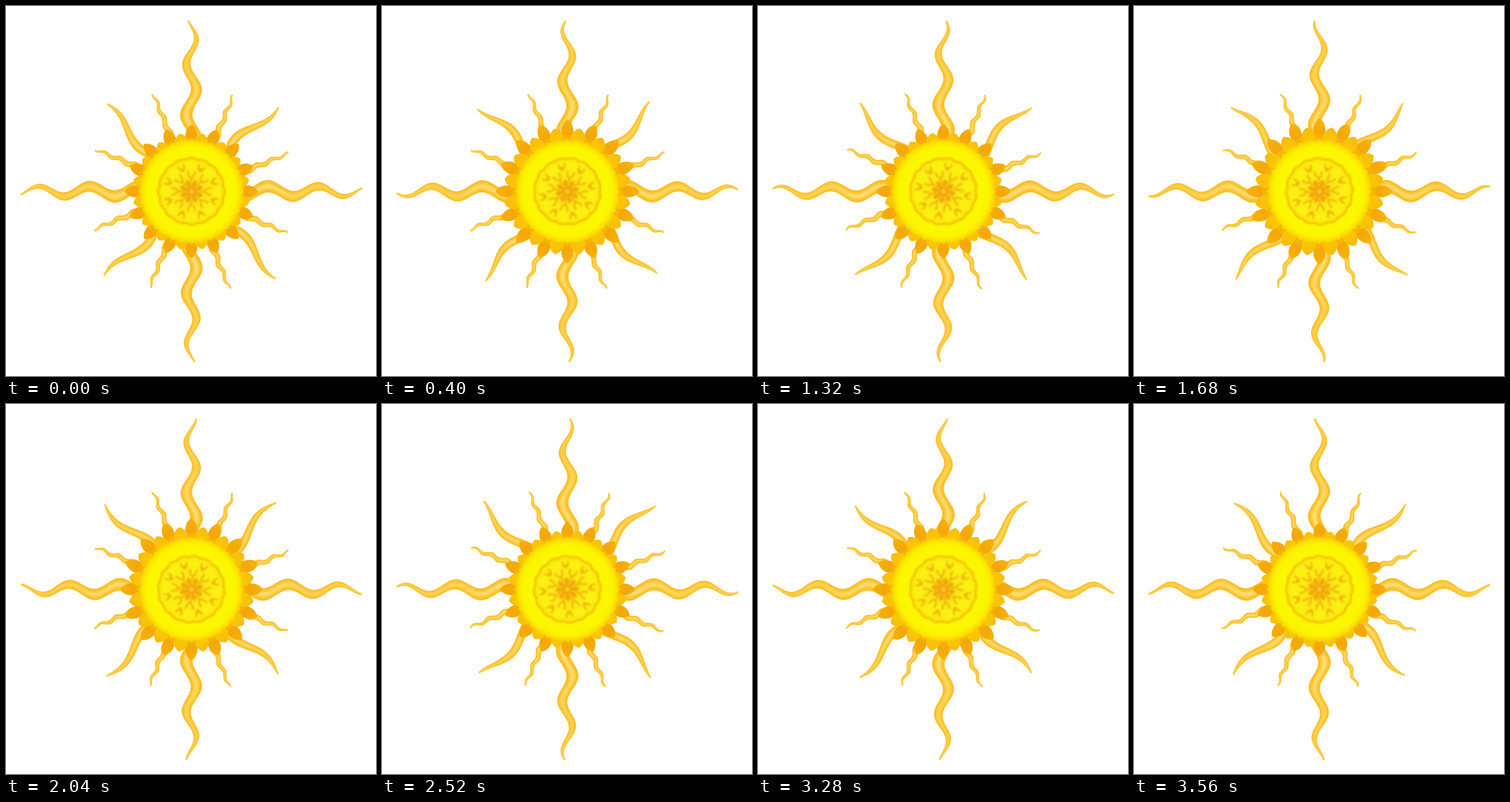
An HTML page with a canvas for the animation above (3.6 s loop, 512 by 512 pixels).

```html
<!DOCTYPE html>
<html lang="en">
<head>
<meta charset="utf-8">
<title>Sun</title>
<style>
  html, body { margin: 0; width: 100%; height: 100%; overflow: hidden; background: #fff; }
  canvas { display: block; width: 512px; height: 512px; }
</style>
</head>
<body>
<canvas id="stage" width="512" height="512"></canvas>
<script>
const TAU = Math.PI * 2;
const MID = 256.5;
const LOOP = 3600;
const STEP = 40;
const ctx = document.getElementById('stage').getContext('2d');

// Waves run outward along each ray; crest is the radius of a peak at time 0.
const LONG = { count: 4, turn: 0, from: 72, to: 236, wave: 70, crest: 141, period: 600,
               amp: [7, 7], shift: 0, width: [18, 2.5] };
const MEDIUM = { count: 4, turn: TAU / 8, from: 72, to: 168, wave: 110, crest: 153, period: 600,
                 amp: [8, 6.5], shift: -1.2, width: [13, 2] };
const SMALL = { count: 8, turn: TAU / 16, from: 72, to: 145, wave: 23, crest: 131.5, period: 400,
                amp: [1.6, 1.8], shift: 2.8, width: [8.5, 2.2] };

const mix = (a, b, k) => a + (b - a) * k;

function fan(c, count, turn, draw) {
  for (let i = 0; i < count; i++) {
    c.save();
    c.rotate(turn + i * TAU / count);
    draw(c);
    c.restore();
  }
}

function radial(c, r0, r1, stops) {
  const g = c.createRadialGradient(0, 0, r0, 0, 0, r1);
  stops.forEach(([at, color]) => g.addColorStop(at, color));
  return g;
}

function disc(c, x, y, r, fill) {
  c.fillStyle = fill;
  c.beginPath();
  c.arc(x, y, r, 0, TAU);
  c.fill();
}

function rayPath(ray, t, fat) {
  const left = [], right = [];
  for (let r = ray.from; r <= ray.to; r++) {
    const k = (r - ray.from) / (ray.to - ray.from);
    const x = ray.shift + mix(...ray.amp, k) *
      Math.cos(TAU * ((r - ray.crest) / ray.wave - t / ray.period));
    const half = fat * mix(...ray.width, k * k) / 2;
    left.push([x - half, -r]);
    right.unshift([x + half, -r]);
  }
  const path = new Path2D();
  left.concat(right).forEach(p => path.lineTo(...p));
  path.closePath();
  return path;
}

function drawRays(ray, t) {
  const edge = rayPath(ray, t, 1);
  const soft = rayPath(ray, t, 0.65);
  const core = rayPath(ray, t, 0.32);
  fan(ctx, ray.count, ray.turn, c => {
    c.fillStyle = '#fcbf26';
    c.fill(edge);
    c.fillStyle = '#fdc93c';
    c.fill(soft);
    c.fillStyle = radial(c, ray.from, ray.to,
      [[0, '#ffdf7c'], [0.55, '#fed354'], [1, '#fecd42']]);
    c.fill(core);
  });
}

function petals(count, turn, tip, base, half, fill) {
  const h = tip - base;
  ctx.fillStyle = fill;
  fan(ctx, count, turn, c => {
    c.beginPath();
    c.moveTo(0, -tip);
    c.bezierCurveTo(half * 0.8, -tip + h * 0.12, half * 1.6, -tip + h * 0.5, half * 0.5, -base);
    c.lineTo(-half * 0.5, -base);
    c.bezierCurveTo(-half * 1.6, -tip + h * 0.5, -half * 0.8, -tip + h * 0.12, 0, -tip);
    c.fill();
  });
}

function makeRosette() {
  const art = document.createElement('canvas');
  art.width = art.height = 128;
  const c = art.getContext('2d');
  c.translate(64, 64);
  c.lineCap = 'round';
  disc(c, 0, 0, 46, radial(c, 0, 46, [[0, '#fdd418'], [0.45, '#fbea14'], [0.8, '#fbf210'], [1, '#fbe60c']]));

  c.filter = 'blur(1px)';
  c.strokeStyle = '#f3c408';
  c.lineWidth = 3;
  c.beginPath();
  for (let i = 0; i <= 192; i++) {
    const a = i / 192 * TAU;
    const r = 44.3 + 2 * Math.abs(Math.cos(8 * a));
    c.lineTo(r * Math.sin(a), -r * Math.cos(a));
  }
  c.stroke();

  // tulips
  fan(c, 8, 0, c => {
    c.strokeStyle = '#efb90a';
    c.lineWidth = 2.4;
    c.beginPath();
    c.moveTo(-4, -38);
    c.quadraticCurveTo(-4.5, -33, 0, -30);
    c.quadraticCurveTo(4.5, -33, 4, -38);
    c.stroke();
    disc(c, 0, -33, 2, '#efb00c');
  });

  // forked sprigs
  fan(c, 8, TAU / 16, c => {
    c.strokeStyle = '#f0b50c';
    c.lineWidth = 2.4;
    c.beginPath();
    c.moveTo(0, -11);
    c.lineTo(0, -19);
    c.moveTo(-5, -27);
    c.quadraticCurveTo(-4, -20, 0, -18);
    c.quadraticCurveTo(4, -20, 5, -27);
    c.stroke();
  });

  // heart flower
  fan(c, 8, 0, c => {
    c.fillStyle = '#f1a80c';
    c.beginPath();
    c.ellipse(0, -11, 3.3, 5.5, 0, 0, TAU);
    c.fill();
  });
  disc(c, 0, 0, 7, '#eea20c');
  disc(c, 0, 0, 3.6, '#fbc81c');
  return art;
}

const rosette = makeRosette();

function draw(t) {
  const grow = 9.5 * (1 - Math.cos(TAU * t / 1200)) / 2;
  ctx.setTransform(1, 0, 0, 1, 0, 0);
  ctx.fillStyle = '#fff';
  ctx.fillRect(0, 0, 512, 512);
  ctx.translate(MID, MID);

  [SMALL, MEDIUM, LONG].forEach(ray => drawRays(ray, t));

  petals(16, 0, 92.5 + grow, 62 + grow, 8,
    radial(ctx, 66, 100, [[0, '#f8b808'], [0.4, '#f3a708'], [1, '#f7b20a']]));
  disc(ctx, 0, 0, 70 + grow, '#f6b406');
  petals(16, TAU / 32, 81.5 + grow, 54 + grow, 9.5,
    radial(ctx, 62, 92, [[0, '#fbe200'], [0.35, '#f9c606'], [1, '#fab90a']]));
  petals(32, 0, 73, 54, 6.5,
    radial(ctx, 60, 73, [[0, '#fdf000'], [1, '#f9cc04']]));
  disc(ctx, 0, 0, 72, radial(ctx, 0, 72,
    [[0, '#fff400'], [0.72, '#fcf800'], [0.86, '#fcf400'], [1, 'rgba(252,235,0,0)']]));

  // a quarter turn per loop
  ctx.rotate(TAU / 16 + t / LOOP * TAU / 4);
  ctx.drawImage(rosette, -64, -64);
}

function frame() {
  const t = performance.now() % LOOP;
  draw(Math.floor(t / STEP) * STEP);
  requestAnimationFrame(frame);
}
frame();
</script>
</body>
</html>
```
